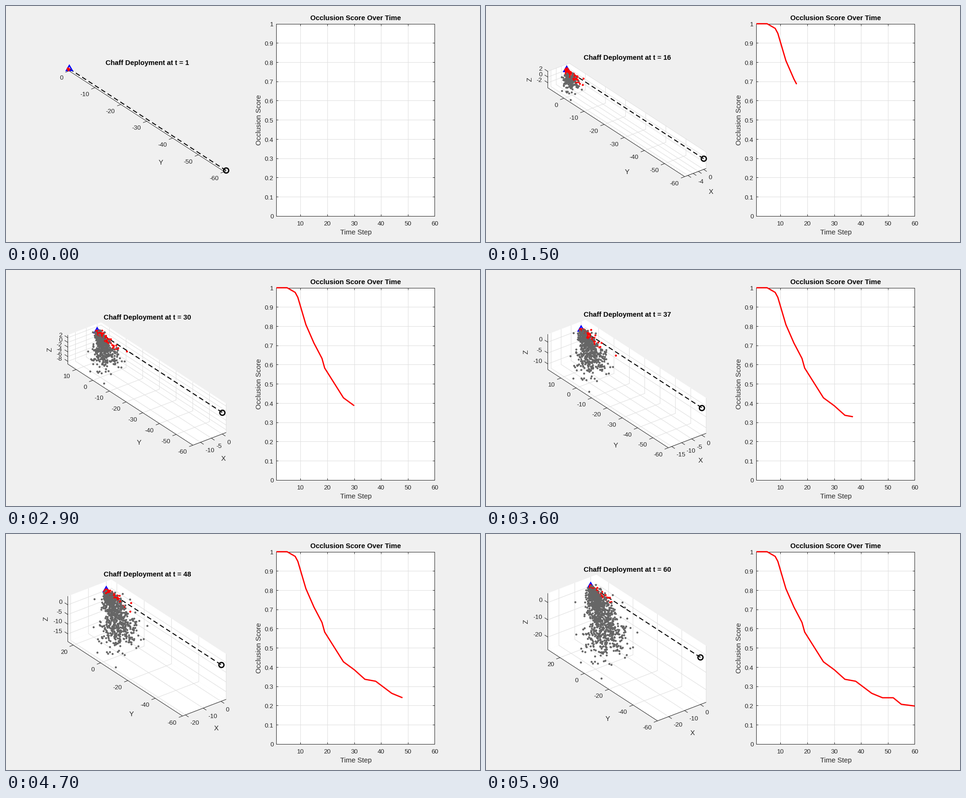
Animation, 1000 px wide and 500 px high, one loop 6000 ms. Source, as a matplotlib script:

```python
import numpy as np
import matplotlib.pyplot as plt
from matplotlib.animation import FuncAnimation
from matplotlib.collections import LineCollection

W, H, DPI, STEPS = 1000, 500, 100, 60
PX = 72 / DPI                      # points per pixel
INK, GRID = "#262626", "#dedede"
TICK_SIZE, LABEL_SIZE = 13.33, 14.67
plt.rcParams["font.family"] = "Liberation Sans"

# Orthographic view: azimuth -37.5, elevation 30 (screen y points down)
AZ, EL = np.radians(-37.5), np.radians(30)
UX = np.array([np.cos(AZ), np.sin(EL) * np.sin(AZ)])
UY = np.array([np.sin(AZ), -np.sin(EL) * np.cos(AZ)])
UZ = np.array([0, -np.cos(EL)])
TO_CAMERA = np.array([np.sin(AZ) * np.cos(EL), -np.cos(AZ) * np.cos(EL), np.sin(EL)])

# Chaff: particles released every step, wind along -x, gravity along -z
PER_STEP, GRAVITY, TARGET_SPEED, BEAM_RADIUS = 20, .01, .5, 2.25
rng = np.random.default_rng(7)
born = np.repeat(np.arange(1, STEPS + 1), PER_STEP)
velocity = rng.normal([-.2, -.01, .03], [.1, .12, .1], (born.size, 3))
velocity = velocity.clip([-.45, -.3, -.155], [.06, .25, .33])

# Occlusion score through its bends
BENDS = [(1, 1), (5, 1), (8, .976), (9, .95), (12, .808), (15, .712), (18, .632),
         (19, .582), (26, .427), (30, .386), (34, .336), (38, .326), (44, .263),
         (48, .24), (52, .24), (55, .206), (60, .197)]
score = np.interp(np.arange(1, STEPS + 1), *zip(*BENDS))

fig = plt.figure(figsize=(W / DPI, H / DPI), dpi=DPI, facecolor="#f0f0f0")
ax = fig.add_axes([0, 0, 1, 1])


def unit(v):
    return v / np.hypot(*v)


def write(x, y, s, size=TICK_SIZE, ha="center", rotation=0, **kw):
    """Text whose capitals are centred on the given line."""
    shift = .36 * size
    x, y = (x + shift, y) if rotation else (x, y + shift)
    kw = {"color": INK, **kw}
    ax.text(x, y, s, fontsize=size * PX, ha=ha, va="baseline",
            rotation=rotation, rotation_mode="anchor", **kw)


def title(x, y, s):
    write(x, y, s, LABEL_SIZE, weight="bold", color="black")


def lines(segments, color, z):
    ax.add_collection(LineCollection(segments, colors=color, linewidths=PX, zorder=z))


def pane(corners):
    ax.fill(*np.array(corners).T, color="white", lw=0, zorder=1)


def ticks(lo, hi, step):
    return step * np.arange(np.ceil(lo / step - 1e-9), np.floor(hi / step + 1e-9) + 1)


def nice_step(span, most, scale=1, gap=0):
    """Smallest round step with few enough ticks, at least gap pixels apart."""
    steps = [m * 10.0 ** e for e in (-2, -1, 0, 1) for m in (1, 2, 5)]
    return next(s for s in steps if span / s <= most and s * scale >= gap)


def chaff(t):
    live = born <= t
    age = (t - born[live] + 1)[:, None]
    pos = velocity[live] * age
    pos[:, 1] += TARGET_SPEED * born[live]
    pos[:, 2] -= GRAVITY / 2 * age[:, 0] ** 2
    pos = pos[np.argsort(pos @ TO_CAMERA)]
    near = np.hypot(pos[:, 0], pos[:, 2]) < BEAM_RADIUS
    return pos, np.where(near, "#ff0000", "#666666")


def draw_scene(t, shrink):
    flat = t == 1                  # too thin for X and Z ticks
    x0, x1 = -.45 * t, .06 * t
    y0, y1 = -60, TARGET_SPEED * t
    z0, z1 = -.155 * t - GRAVITY / 2 * t * t, min(.25 * t, .9 + .075 * t)
    left, right = 130.4, 464.4 - shrink
    scale = (right - left) / (UX[0] * (x1 - x0) - UY[0] * (y1 - y0))
    height = -scale * (UX[1] * (x1 - x0) + UY[1] * (y1 - y0) + UZ[1] * (z1 - z0))
    front = np.array([left - scale * UY[0] * (y1 - y0), 241 + height / 2])

    def project(x, y, z):
        return front + scale * ((x - x0) * UX + (y - y0) * UY + (z - z0) * UZ)

    for wall in ([(x0, y0, z0), (x1, y0, z0), (x1, y1, z0), (x0, y1, z0)],
                 [(x0, y1, z0), (x1, y1, z0), (x1, y1, z1), (x0, y1, z1)],
                 [(x1, y0, z0), (x1, y1, z0), (x1, y1, z1), (x1, y0, z1)]):
        pane([project(*p) for p in wall])

    x_step = nice_step(x1 - x0, 4.2)
    z_step = nice_step(z1 - z0, 6.4, scale * np.cos(EL), 6.5)
    xs = [] if flat else ticks(x0, x1, x_step)
    ys = ticks(y0, y1, nice_step(y1 - y0, 8))
    zs = [] if flat else ticks(z0, z1, z_step)

    grid = [[project(x, y0, z0), project(x, y1, z0), project(x, y1, z1)] for x in xs]
    grid += [[project(x0, y, z0), project(x1, y, z0), project(x1, y, z1)] for y in ys]
    grid += [[project(x0, y1, z), project(x1, y1, z), project(x1, y0, z)] for z in zs]
    if flat:
        grid.append([project(x1, y0, z1), project(x1, y1, z1)])
    lines(grid, GRID, 2)

    x_end, y_end, z_end = project(x1, y0, z0), project(x0, y1, z0), project(x0, y1, z1)
    dark = [[z_end, y_end, front, x_end]]
    for x in xs:
        p = project(x, y0, z0)
        dark.append([p, p - 8 * unit(UY)])
        if x_step * scale * UX[0] > 13 or round(x / x_step) % 2 == 0:
            write(p[0] + 10, p[1] + 16.3, f"{x + 0:g}", ha="left")
    for y in ys:
        p = project(x0, y, z0)
        dark.append([p, p - 8.4 * unit(UX)])
        write(p[0] - 12.3, p[1] + 13.5, f"{y + 0:g}", ha="right")
    for z in zs:
        p = project(x0, y1, z)
        dark.append([p, p + 8 * unit(UY)])
        write(p[0] - 12, p[1] - 6.5, f"{z + 0:g}", ha="right")
    lines(dark, INK, 3)

    # Axis names drift towards their axes as the box deepens
    mid = (front + y_end) / 2
    write(mid[0] + 31 * np.exp(-t / 55), mid[1] + 88 - .3 * t, "Y", LABEL_SIZE)
    if not flat:
        mid = (front + x_end) / 2
        write(mid[0] + 36 - .22 * t, mid[1] + 38 + .1 * t, "X", LABEL_SIZE)
        widest = max(len(f"{z:g}") for z in zs)
        write(91 - 7.5 * max(0, widest - 2), (y_end[1] + z_end[1]) / 2, "Z",
              LABEL_SIZE, rotation=90)
    title((left + right) / 2 + .5, front[1] - height - 11.5, f"Chaff Deployment at t = {t}")

    radar, target = project(0, y0, 0), project(0, y1, 0)
    ax.plot(*np.array([radar, target]).T, "k", lw=2 * PX, dashes=(5, 3),
            dash_capstyle="butt", zorder=4)
    ax.plot(*radar, "o", ms=10.7 * PX, mfc="none", mec="black", mew=2.67 * PX, zorder=5)
    angles = np.radians([-90, 30, 150])
    corners = target + 7.2 * np.column_stack([np.cos(angles), np.sin(angles)])
    ax.fill(*corners.T, fill=False, ec="blue", lw=2.67 * PX, joinstyle="miter", zorder=5)

    pos, colors = chaff(t)
    dots = front + scale * ((pos - [x0, y0, z0]) @ np.array([UX, UY, UZ]))
    ax.scatter(*dots.T, s=(4.3 * PX) ** 2, c=colors, linewidths=0, zorder=6)


def draw_score(t, shrink):
    left, right, top, bottom = 570.4, 904.4 - shrink, 37.6, 444.6

    def to_x(n):
        return left + (n - 1) / (STEPS - 1) * (right - left)

    def to_y(v):
        return bottom - v * (bottom - top)

    frame = [(left, top), (right, top), (right, bottom), (left, bottom), (left, top)]
    pane(frame)
    grid, dark = [], [frame]
    for n in range(10, STEPS + 1, 10):
        x = to_x(n)
        grid.append([(x, top), (x, bottom)])
        dark += [[(x, top), (x, top + 4)], [(x, bottom), (x, bottom - 4)]]
        write(x, 460, n)
    for k in range(11):
        y = to_y(k / 10)
        grid.append([(left, y), (right, y)])
        dark += [[(left, y), (left + 4, y)], [(right, y), (right - 4, y)]]
        write(564.5, y + 1, f"{k / 10:g}", ha="right")
    lines(grid, GRID, 2)
    lines(dark, INK, 3)
    ax.plot(to_x(np.arange(1, t + 1)), to_y(score[:t]), color="red", lw=2.67 * PX,
            solid_capstyle="butt", solid_joinstyle="round", zorder=5)
    mid = (left + right) / 2
    title(mid, 24.7, "Occlusion Score Over Time")
    write(mid + .5, 479, "Time Step", LABEL_SIZE)
    write(533, 241, "Occlusion Score", LABEL_SIZE, rotation=90)


def draw(frame):
    t = frame + 1
    ax.clear()
    ax.set(xlim=(0, W), ylim=(H, 0))
    ax.axis("off")
    # Once the X name shows, it squeezes both plots until the box is deep enough
    shrink = np.clip(2 * (13 - t), 0, 16) if t > 1 else 0
    draw_scene(t, shrink)
    draw_score(t, shrink)
    return []


animation = FuncAnimation(fig, draw, frames=STEPS, interval=100, init_func=lambda: [],
                          repeat=True, repeat_delay=0)
plt.show()
```
